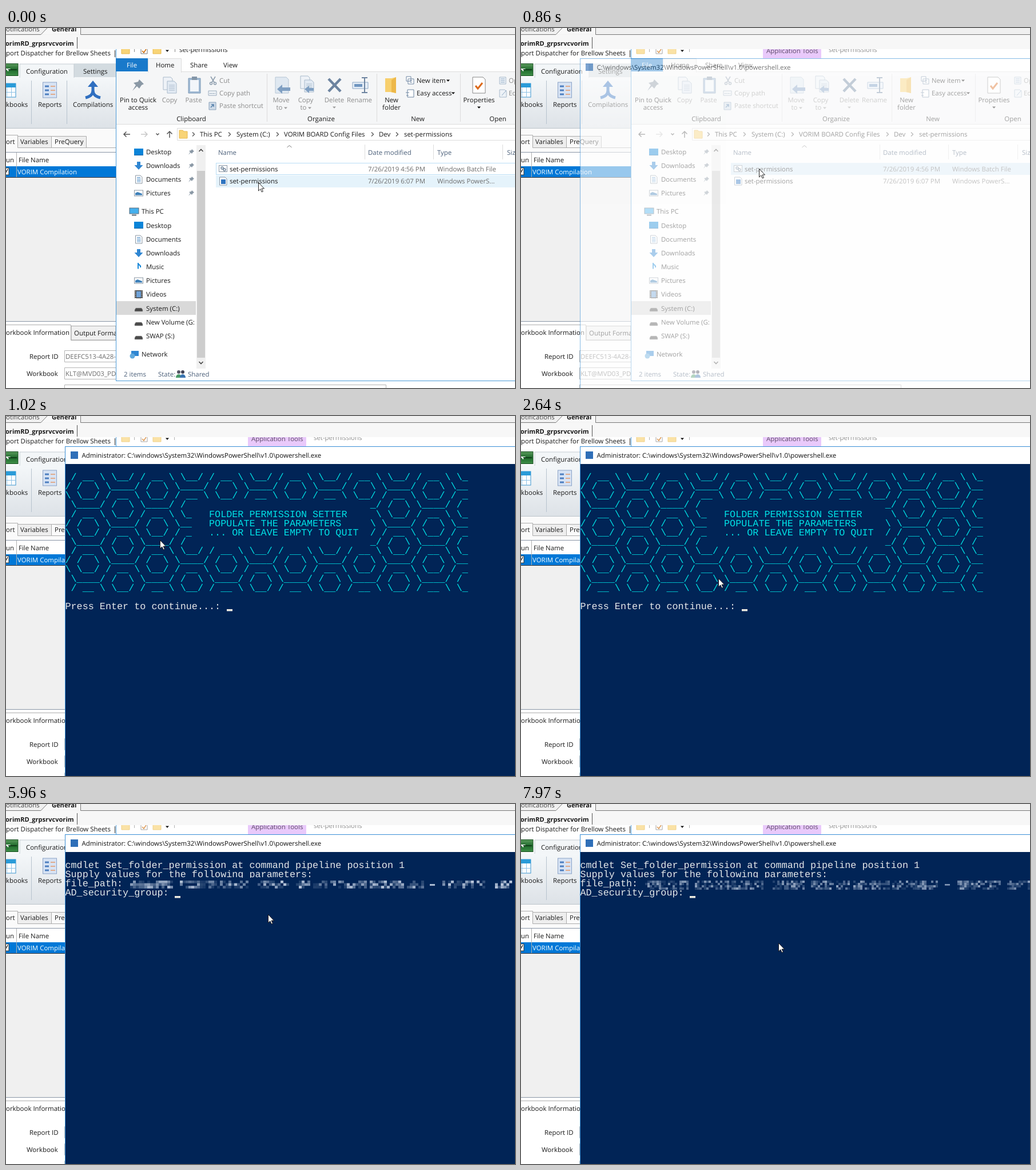
Recreate the animation shown at these times as an HTML page. Size 890x630 px, loop 8 s.

```html
<!DOCTYPE html>
<html lang="en">
<head>
<meta charset="utf-8">
<title>Folder permission setter</title>
<style>
html, body { margin: 0; width: 100%; height: 100%; overflow: hidden; background: #fff; }
svg { display: block; }
text { font: 11.45px "Open Sans", "Noto Sans", sans-serif; fill: #1a1a1a; text-rendering: geometricPrecision; white-space: pre; }
.b text, text.b { font-weight: 700; font-size: 11.1px; }
.mid text { text-anchor: middle; }
.off text, text.off { fill: #8c8c8c; }
.dim text, text.dim { fill: #6d6d6d; }
.head text { fill: #4c607a; }
.w { fill: #fff; }
.term text { font: 16.77px "Liberation Mono", monospace; fill: #e6e8ea; }
.term .art text { fill: #00e2e6; }
.ln { fill: none; stroke: #dcdcdc; }

.t { animation: 8s step-end -8ms infinite; }
#active { animation-name: active; }
#idle { animation-name: idle; }
#hover { animation-name: hover; }
#row { animation-name: row; }
#click { animation-name: click; mix-blend-mode: multiply; }
#win { animation-name: win; }
#blank { animation-name: blank; }
#banner { animation-name: banner; }
#ask { animation-name: ask; }
#group { animation-name: group; }
#blurA { animation-name: blurA; }
#blurB { animation-name: blurB; }
#caret { animation-name: caret; }
#mouse { animation-name: mouse; }
@keyframes active { 0% { visibility: visible } 10.75% { visibility: hidden } }
@keyframes idle { 0% { visibility: hidden } 10.75% { visibility: visible } }
@keyframes hover { 0% { visibility: visible } 1.875% { visibility: hidden } }
@keyframes row {
  0% { fill: #fff; stroke: #b9ddf5 }
  1.875% { fill: #e5f3fb; stroke: #b9ddf5 }
  6.75% { fill: #d9eaf7; stroke: #d9eaf7 }
}
@keyframes click {
  0% { visibility: hidden } 6.75% { visibility: visible }
  8.75% { visibility: hidden } 9.75% { visibility: visible } 10.75% { visibility: hidden }
}
@keyframes win { 0% { opacity: 0 } 10.75% { opacity: .6 } 11.75% { opacity: 1 } }
@keyframes blank { 0% { visibility: visible } 12.75% { visibility: hidden } }
@keyframes banner { 0% { visibility: hidden } 12.75% { visibility: visible } 46.5% { visibility: hidden } }
@keyframes ask { 0% { visibility: hidden } 46.5% { visibility: visible } }
@keyframes group { 0% { visibility: hidden } 74.5% { visibility: visible } }
@keyframes blurA { 0% { visibility: hidden } 74.5% { visibility: visible } 89.875% { visibility: hidden } }
@keyframes blurB { 0% { visibility: hidden } 89.875% { visibility: visible } }
@keyframes caret {
  0% { visibility: hidden; transform: translate(386px, 338px) }
  12.75% { visibility: visible; transform: translate(386px, 338px) }
  46.5% { visibility: visible; transform: translate(215px, 145px) }
  74.5% { visibility: visible; transform: translate(295px, 161px) }
}
@keyframes mouse {
  0% { transform: translate(441px, 270px) }
  .875% { transform: translate(436px, 264px) }
  1.875% { transform: translate(428px, 256px) }
  2.875% { transform: translate(420px, 249px) }
  3.875% { transform: translate(416px, 246px) }
  12.75% { transform: translate(269px, 217px) }
  28.125% { transform: translate(270px, 222px) }
  31% { transform: translate(274px, 243px) }
  32% { transform: translate(300px, 275px) }
  33% { transform: translate(345px, 284px) }
  34% { transform: translate(396px, 262px) }
  34.875% { transform: translate(432px, 219px) }
  35.875% { transform: translate(452px, 191px) }
  38.75% { transform: translate(455px, 192px) }
  39.625% { transform: translate(458px, 193px) }
  98.625% { transform: translate(575px, 296px) }
  99.625% { transform: translate(450px, 243px) }
}
</style>
</head>
<body>
<svg width="890" height="630" viewBox="0 0 890 630">
<defs>
  <linearGradient id="rib" x2="0" y2="1"><stop stop-color="#f4f7f9"/><stop offset="1" stop-color="#dde2e7"/></linearGradient>
  <linearGradient id="grn" x2="0" y2="1"><stop stop-color="#5a9a5c"/><stop offset=".5" stop-color="#1f6a2c"/><stop offset="1" stop-color="#3f8f48"/></linearGradient>
  <path id="gt" d="M-2 -3.5L1.5 0L-2 3.5" fill="none" stroke="#555" stroke-width="1.3"/>
  <path id="tri" d="M-3 -1.5H3L0 1.8Z"/>
  <path id="folder" d="M-7 -7H-1L1 -5H7V7H-7Z" fill="#f8d477" stroke="#e8b84c"/>
  <g id="desk"><rect x="-8" y="-6" width="16" height="12" fill="#0a84d8"/><path d="M-8 5.5H8" stroke="#0562a5"/></g>
  <path id="down" d="M-3 -7H3V-1H7.5L0 7L-7.5 -1H-3Z" fill="#2f86d2"/>
  <g id="doc"><path d="M-5.5 -7H3L6 -4V7H-5.5Z" fill="#fff" stroke="#8b97a3"/><path d="M-3 -3.5H3M-3 -1H3.5M-3 1.5H3.5M-3 4H3.5" stroke="#4a8cc7"/></g>
  <g id="pic"><rect x="-7.5" y="-5" width="15" height="10" fill="#fff" stroke="#8b97a3"/><path d="M-6 3.5V0L-2 -2L6 1V3.5Z" fill="#3c7fb8"/></g>
  <path id="note" d="M-1 -7V3.5M-1 -6C0 -3 4.5 -3 3 1" fill="none" stroke="#1687d9" stroke-width="2"/>
  <g id="pc"><rect x="-8" y="-6" width="16" height="10" fill="#45b0ee" stroke="#5a6b78"/><path d="M-4 6.5H4" stroke="#5a6b78" stroke-width="2"/></g>
  <g id="video"><rect x="-7" y="-7" width="14" height="14" fill="#444"/><rect x="-4" y="-5.5" width="8" height="11" fill="#6fa2d8"/><path d="M-5.5 -6V7M5.5 -6V7" stroke="#fff" stroke-dasharray="1.5"/></g>
  <path id="drive" d="M-5 0H5L7 3V6H-7V3Z" fill="#4b4b4b" stroke="#aaa" stroke-width=".6"/>
  <path id="pin" d="M1 -5L5 -1L3 0L1 3L-1 1L-5 5L-2 0L-4 -2L0 -3Z" fill="#8a98a5"/>
  <g id="pages"><path d="M-11 -14H2L5 -11V8H-11Z" fill="#eef2f7" stroke="#a9bacb"/><path d="M-4 -7H8L12 -3V14H-4Z" fill="#e2eaf3" stroke="#a9bacb"/><path d="M-1 0H9M-1 3H9M-1 6H9M-1 9H9" stroke="#a9bacb"/></g>
</defs>

<!-- report application -->
<rect width="890" height="630" fill="#fff"/>
<text x="0" y="48">port Dispatcher for Brellow Sheets</text>
<path d="M190.500 39V51" stroke="#333"/>
<rect y="53" width="192" height="33" fill="#fff"/>
<rect x="119" y="62" width="73" height="24" fill="#d3dbe0"/>
<rect y="86" width="192" height="90" fill="url(#rib)"/>
<path d="M24 87V63H119V87" fill="#f3f6f8" stroke="#c3cbd2"/>
<rect x="-4" y="62.500" width="25" height="21" fill="url(#grn)" stroke="#184f22"/>
<path d="M-1 71H8L3.500 76Z" fill="#fff"/><path d="M4 73H19" stroke="#123f1a" stroke-width="2"/>
<path d="M44.500 92V168M106.500 92V168" stroke="#b7c3ce"/>
<path d="M0 175.500H192" stroke="#bcc4cb"/>
<g><rect x="-8" y="97" width="25" height="24" fill="#fff" stroke="#3b95cf"/><rect x="-8" y="97" width="25" height="7" fill="#2a9bd8"/><path d="M0 112.500H17M1.500 104V121M9.500 104V121" stroke="#8cc1e4"/></g>
<g><rect x="64.500" y="95" width="24" height="27" fill="#d7e3f4" stroke="#8ba3c7"/><path d="M68 102H75M68 109H75M68 116H75" stroke="#4d7fc0" stroke-width="3"/><path d="M78 102H86M78 109H86M78 116H86" stroke="#e39a6b" stroke-width="1.500"/></g>
<path d="M152 98V111M152 108C152 117 147 120 139 122M152 108C152 117 157 120 165 122" fill="none" stroke="#2f6fc0" stroke-width="5"/>
<path d="M143 103L152 92L161 103Z" fill="#2f6fc0"/>
<text x="35" y="80">Configuration</text><text x="135" y="80">Settings</text>
<text x="0" y="138">kbooks</text><text x="56" y="138">Reports</text><text x="117" y="138">Compilations</text>
<rect y="176" width="192" height="41" fill="#fafafa"/>
<path d="M20.500 209V189.500H79.500V209M79.500 189.500H140.500V209" fill="#eee" stroke="#acacac"/>
<path d="M-1 187.500H20.500V209.500H192" fill="none" stroke="#acacac"/>
<text x="0" y="203">ort</text><text x="25" y="203">Variables</text><text x="85" y="203">PreQuery</text>
<rect x="-1" y="217.500" width="194" height="296" fill="#f0f0f0" stroke="#8a95a6"/>
<rect y="218" width="192" height="24" fill="#fff"/>
<rect y="242" width="192" height="19" fill="#0078d7"/>
<path d="M18.500 218V261" stroke="#b0b0b0"/><path d="M0 261.500H192" stroke="#333"/>
<rect x="-7" y="245" width="12" height="12" fill="#fff" stroke="#333"/><path d="M-3 251L-1 254L3 247" fill="none" stroke="#222" stroke-width="1.400"/>
<text x="0" y="234.500">un</text><text x="22" y="234.500">File Name</text><text class="w" x="20" y="256">VORIM Compilation</text>
<path d="M114 546V521.500H192V546Z" fill="#f0f0f0" stroke="#acacac"/>
<path d="M-1 519.500H113.500V546.500H192" fill="none" stroke="#acacac"/>
<text x="0" y="537">orkbook Information</text><text x="119" y="537.500">Output Format</text>
<text x="41" y="579">Report ID</text><text x="36" y="609">Workbook</text>
<path d="M300 564.500H102.500V584.500H300M300 594.500H102.500V614.500H300M102.500 631V624.500H664.500V631" fill="none" stroke="#b4b4b4"/>
<text class="dim" x="104" y="579">DEEFC513-4A28-4</text><text class="dim" x="104" y="609">KLT@MVD03_PD1</text>

<!-- file explorer -->
<rect x="192.500" y="30" width="720" height="587.500" fill="#fff" stroke="#4a9ad8"/>
<g id="active" class="t">
  <use href="#folder" x="209" y="38"/><use href="#folder" x="264" y="38"/>
  <path d="M236 32H247V45H236Z" fill="#fff" stroke="#777"/><path d="M238 40L241 43L245 37" fill="none" stroke="#c60" stroke-width="1.500"/>
  <path d="M224.500 36V42M295.500 36V42" stroke="#888"/><use href="#tri" x="282" y="40"/>
  <text x="303" y="42">set-permissions</text>
</g>
<g id="idle" class="t">
  <rect x="193" y="37" width="697" height="16" fill="#fff"/>
  <g opacity=".65"><use href="#folder" x="209" y="38"/><use href="#folder" x="264" y="38"/>
  <path d="M236 32H247V45H236Z" fill="#fff" stroke="#777"/><path d="M238 40L241 43L245 37" fill="none" stroke="#c60" stroke-width="1.500"/>
  <path d="M224.500 36V42M294.500 36V42" stroke="#888"/></g><use href="#tri" x="282" y="40"/>
  <rect x="423" y="37" width="102" height="16" fill="#e9c9fb"/>
  <text x="429" y="44" style="fill:#5d4a68">Application Tools</text><text class="off" x="538" y="42">set-permissions</text>
</g>
<rect x="193" y="77" width="697" height="91" fill="#f5f6f7"/>
<path d="M193 168.500H890M306.500 76.500H890" class="ln"/>
<path d="M248.500 78V53.500H306.500V78" fill="#f5f6f7" stroke="#dcdcdc"/>
<rect x="192" y="53" width="56" height="23" fill="#1979ca"/>
<text class="w" x="211" y="69">File</text><text x="262" y="69">Home</text><text x="322" y="69">Share</text><text x="380" y="69">View</text>
<path d="M456.500 80V164M648.500 80V164M794.500 80V164" class="ln"/>

<use href="#pin" transform="translate(231 100) scale(2)"/>
<use href="#pages" x="286" y="100"/>
<path d="M319 88H340V114H319Z" fill="#9fb9d3" stroke="#7f9bb7"/><path d="M322 91H337V111H322Z" fill="#f2f6fa"/><path d="M325 85H334V91H325Z" fill="#8496a8"/>
<path d="M358 85L364 95M366 85L360 95" stroke="#8c9cac" stroke-width="1.500"/><g fill="none" stroke="#8c9cac" stroke-width="1.500"><circle cx="358.500" cy="97" r="2"/><circle cx="365.500" cy="97" r="2"/></g>
<path d="M354 110H368V118H354Z" fill="#eef2f6" stroke="#9aabbd"/><path d="M356 114.500H366" stroke="#7d93a9" stroke-dasharray="2 1"/>
<path d="M355 130H367V143H355Z" fill="#cfdbe8" stroke="#8aa2ba"/><path d="M358 139L363 134M359 134H363V138" fill="none" stroke="#5580aa" stroke-width="1.500"/>
<path d="M471 86H490L494 90V114H471Z" fill="#dfe8f1" stroke="#b6c5d4"/><path d="M497 104H483V99L474 107L483 115V110H497Z" fill="#7f9fc2"/>
<use href="#pages" x="526" y="98"/><path d="M538 105H530V101L522 107L530 114V110H538Z" fill="#7f9fc2"/>
<path d="M564 89L585 111M585 89L564 111" stroke="#6d84a0" stroke-width="4.500"/>
<path d="M606 95H633V106H606Z" fill="#e6eef7" stroke="#8ba6c4"/><path d="M609 98H623V103H609Z" fill="#7096c0"/><path d="M622 87H632M627 87V113M622 113H632" stroke="#6d84a0" stroke-width="2"/>
<path d="M663 88H674L682 86V114L672 112H663Z" fill="#f7cf6d"/><path d="M674 91L682 86V114L674 112Z" fill="#edb84a"/>
<g fill="#fff" stroke="#6d84a0"><path d="M700 85H708V93H700ZM703 89H713V98H703ZM702 108H713V121H702Z"/><path d="M706 92H710M706 95H710M699 113H705M700 118H704"/></g>
<path d="M816 86H834L838 90V114H816Z" fill="#fff" stroke="#888"/><path d="M821 101L825 106L833 96" fill="none" stroke="#dc6a1c" stroke-width="3"/>
<path d="M863 86H874V98H863ZM863 108H872L875 111V121H863Z" fill="#edf2f7" stroke="#a6b8ca"/><path d="M865 89H872M865 92H872M865 95H872M867 118L875 109" stroke="#8fa9c4"/>
<g class="mid">
  <text x="231" y="130">Pin to Quick</text><text x="231" y="143">access</text><text x="674" y="130">New</text><text x="674" y="143">folder</text><text x="827" y="130">Properties</text>
  <g class="off"><text x="286" y="130">Copy</text><text x="328" y="130">Paste</text><text x="481" y="130">Move</text><text x="478" y="143">to</text><text x="524" y="130">Copy</text><text x="520" y="143">to</text><text x="574" y="130">Delete</text><text x="618" y="130">Rename</text></g>
  <text x="324" y="163">Clipboard</text><text x="551" y="163">Organize</text><text x="720" y="163">New</text><text x="860" y="163">Open</text>
</g>
<g class="off"><text x="373" y="96">Cut</text><text x="373" y="118">Copy path</text><text x="373" y="140">Paste shortcut</text><text x="879" y="96">Open</text><text x="879" y="118">Edit</text></g>
<text x="718" y="96">New item</text><text x="718" y="118">Easy access</text>
<use href="#tri" x="773" y="92"/><use href="#tri" x="782" y="114"/><use href="#tri" x="827" y="139"/>
<g fill="#999"><use href="#tri" x="489" y="140"/><use href="#tri" x="531" y="140"/><use href="#tri" x="574" y="139"/></g>

<g fill="none" stroke="#555" stroke-width="1.500"><path d="M217 186H206M210.500 181.500L206 186L210.500 190.500M286 192V181M281.500 185.500L286 181L290.500 185.500M262.500 184.500L265 187L267.500 184.500"/><path d="M236 186H247M242.500 181.500L247 186L242.500 190.500" stroke="#c8c8c8"/></g>
<path d="M890 175.500H299.500V196.500H890" class="ln"/>
<use href="#folder" x="310" y="186"/>
<use href="#gt" x="328" y="186"/><use href="#gt" x="391" y="186"/><use href="#gt" x="475" y="186"/><use href="#gt" x="641" y="186"/><use href="#gt" x="684" y="186"/>
<text x="339" y="189.500">This PC</text><text x="403" y="189.500">System (C:)</text><text x="486" y="189.500">VORIM BOARD Config Files</text><text x="652" y="189.500">Dev</text><text x="696" y="189.500">set-permissions</text>

<rect x="193" y="478" width="139" height="24" fill="#d9d9d9"/>
<use href="#desk" x="232" y="217"/><use href="#down" x="232" y="241"/><use href="#doc" x="232" y="265"/><use href="#pic" x="232" y="289"/>
<use href="#pin" x="324" y="217"/><use href="#pin" x="324" y="241"/><use href="#pin" x="324" y="265"/><use href="#pin" x="324" y="289"/>
<use href="#pc" x="224" y="321"/><use href="#desk" x="232" y="345"/><use href="#doc" x="232" y="370"/><use href="#down" x="232" y="394"/><use href="#note" x="232" y="418"/><use href="#pic" x="232" y="442"/><use href="#video" x="232" y="466"/>
<use href="#drive" x="232" y="490"/><use href="#drive" x="232" y="515"/><use href="#drive" x="232" y="539"/>
<path d="M219 565H232V574H219Z" fill="#2f86d2"/><circle cx="221" cy="574" r="4.500" fill="#5fa8dc"/>
<text x="245" y="220.500">Desktop</text><text x="245" y="244.500">Downloads</text><text x="245" y="269">Documents</text><text x="245" y="293">Pictures</text>
<text x="237" y="325">This PC</text><text x="245" y="349.500">Desktop</text><text x="245" y="373.500">Documents</text><text x="245" y="397.500">Downloads</text><text x="245" y="422">Music</text><text x="245" y="446">Pictures</text><text x="245" y="470">Videos</text>
<text x="245" y="494.500">System (C:)</text><text x="245" y="518.500">New Volume (G:</text><text x="245" y="542.500">SWAP (S:)</text><text x="237" y="575">Network</text>
<rect x="333" y="205" width="16" height="391" fill="#f0f0f0"/><rect x="334" y="250" width="14" height="327" fill="#cdcdcd"/>
<path d="M337.500 216L341 212.500L344.500 216M337.500 584L341 587.500L344.500 584" fill="none" stroke="#444" stroke-width="1.600"/>
<g class="head"><text x="206" y="610">2 items</text><text x="266" y="610">State:</text><text x="318" y="610">Shared</text><text x="371" y="221.500">Name</text><text x="633" y="221.500">Date modified</text><text x="754" y="221.500">Type</text><text x="876" y="221.500">Size</text></g>
<g><circle cx="302" cy="602" r="3" fill="#556"/><path d="M297 612C297 604 307 604 307 612Z" fill="#4a9a6a"/><circle cx="309" cy="602" r="3" fill="#445"/><path d="M304 612C304 604 314 604 314 612Z" fill="#3c74b0"/></g>
<path d="M627.500 204V230M747.500 204V230M868.500 204V230" class="ln"/>
<path d="M491.500 209L495.500 205.500L499.500 209" fill="none" stroke="#777"/>
<rect id="hover" class="t" x="367" y="258" width="523" height="21" fill="#e5f3fb"/>
<rect id="row" class="t" x="367.500" y="236.500" width="530" height="20"/>
<rect x="372.500" y="240.500" width="14" height="11" fill="#fff" stroke="#8a97a5"/><g fill="none" stroke="#6f8499" stroke-width="1.400"><circle cx="378" cy="245" r="2"/><circle cx="382" cy="248" r="2"/></g>
<path d="M373.500 261H383L386 264V275H373.500Z" fill="#fff" stroke="#8a97a5"/><rect x="376" y="265" width="8" height="8" fill="#2f74c0"/>
<text x="391" y="250.500">set-permissions</text><text x="391" y="272">set-permissions</text>
<g class="dim"><text x="633" y="250.500">7/26/2019 4:56 PM</text><text x="633" y="272">7/26/2019 6:07 PM</text><text x="754" y="250.500">Windows Batch File</text><text x="754" y="272">Windows PowerS...</text></g>

<!-- tab strips across the top -->
<rect width="890" height="37" fill="#f7f7f7"/><rect width="890" height="12" fill="#f0f0f0"/>
<path d="M0 11.500H61L73 -1H130.500V11.500H890" fill="#f8f8f8" stroke="#777"/>
<path d="M124.500 16V36" stroke="#555"/>
<text x="0" y="6" style="fill:#444">otifications</text>
<g class="b"><text x="80" y="6">General</text><text x="-1" y="31">orimRD_grpsrvcvorim</text></g>

<circle id="click" class="t" cx="416.500" cy="246.500" r="11.500" fill="#f4ea3c"/>

<!-- console -->
<g id="win" class="t">
  <rect x="103.500" y="53.500" width="800" height="600" fill="#fff" stroke="#3a8fd6"/>
  <rect x="113" y="62" width="13" height="13" fill="#2f6fb8"/>
  <g id="blank" class="t"><rect x="104" y="84" width="786" height="546" fill="#fdfdfd"/><text x="132.500" y="73">C:\windows\System32\WindowsPowerShell\v1.0\powershell.exe</text></g>
  <g id="banner" class="t term"><g class="art"></g></g>
  <g id="ask" class="t term"></g>
  <g id="group" class="t term"></g>
  <g id="blurA" class="t"></g>
  <g id="blurB" class="t"></g>
  <rect id="caret" class="t" width="10" height="3.500" fill="#eceae0"/>
</g>
<path id="mouse" class="t" d="M.5 .5V15L3.800 11.800L6.200 17L8.400 16L6 11H10.500Z" fill="#fff" stroke="#111" stroke-width=".9"/>
</svg>
<script>
const $ = s => document.querySelector(s);
const add = (parent, tag, attrs, text = '') => {
  const el = document.createElementNS('http://www.w3.org/2000/svg', tag);
  for (const k in attrs) el.setAttribute(k, attrs[k]);
  el.textContent = text;
  return parent.appendChild(el);
};
const print = (parent, row, text) =>
  add(parent, 'text', { x: 103.5, y: 112 + 16.14 * row }, text.replace(/ /g, '\u00a0'));

// Console page and full window title, shared by the prompts
for (const id of ['#banner', '#ask']) {
  const page = add($(id), 'rect', { x: 104, y: 84, width: 786, height: 546, fill: '#012456' });
  $(id).prepend(page);
  add($(id), 'text', { x: 132.5, y: 73, style: 'font:11.45px "Open Sans","Noto Sans",sans-serif;fill:#111' },
    'Administrator: C:\\windows\\System32\\WindowsPowerShell\\v1.0\\powershell.exe');
}

// Honeycomb: four repeating rows with a gap for the message
const comb = [' / __ \\ \\__/', '/ /  \\ \\____', '\\ \\__/ / __ ', ' \\____/ /  \\'];
const joint = [' ', '/', '\\', ' '];
const note = { 4: 'FOLDER PERMISSION SETTER', 5: 'POPULATE THE PARAMETERS', 6: '... OR LEAVE EMPTY TO QUIT' };
for (let r = 0; r < 13; r++) {
  let s = (comb[r % 4].repeat(6)).slice(0, 70);
  if (r > 2 && r < 8) s = s.slice(0, 22) + ('   ' + (note[r] || '')).padEnd(31) + s.slice(53);
  print($('.art'), r, s);
}
print($('#banner'), 14, 'Press Enter to continue...:');
print($('#ask'), 0, 'cmdlet Set_folder_permission at command pipeline position 1');
print($('#ask'), 1, 'Supply values for the following parameters:');
print($('#ask'), 2, 'file_path:');
print($('#group'), 3, 'AD_security_group:');

// Pixelated path: random blocks laid out in words
const words = [[217, 292], [304, 424], [440, 494], [507, 575], [581, 728], [763, 838], [850, 890]];
function blur(id, w, h, seed, light) {
  const rnd = () => (seed = seed * 16807 % 2147483647) / 2147483647;
  const g = $(id);
  add(g, 'rect', { x: 216, y: 129, width: 674, height: 19, fill: '#012456' });
  add(g, 'rect', { x: 741, y: 140, width: 9, height: h / 1.5, fill: '#b4c2d8', opacity: light });
  for (const [a, b] of words)
    for (let x = a; x < b; x += w)
      for (let y = 134; y < 147; y += h) {
        const v = rnd();
        if (v > .35) add(g, 'rect', { x, y, width: w, height: h, fill: '#c3cfe2', opacity: (v * v * light).toFixed(2) });
      }
}
blur('#blurA', 5, 4.6, 4127, .95);
blur('#blurB', 4, 4, 977, .72);
</script>
</body>
</html>
```
